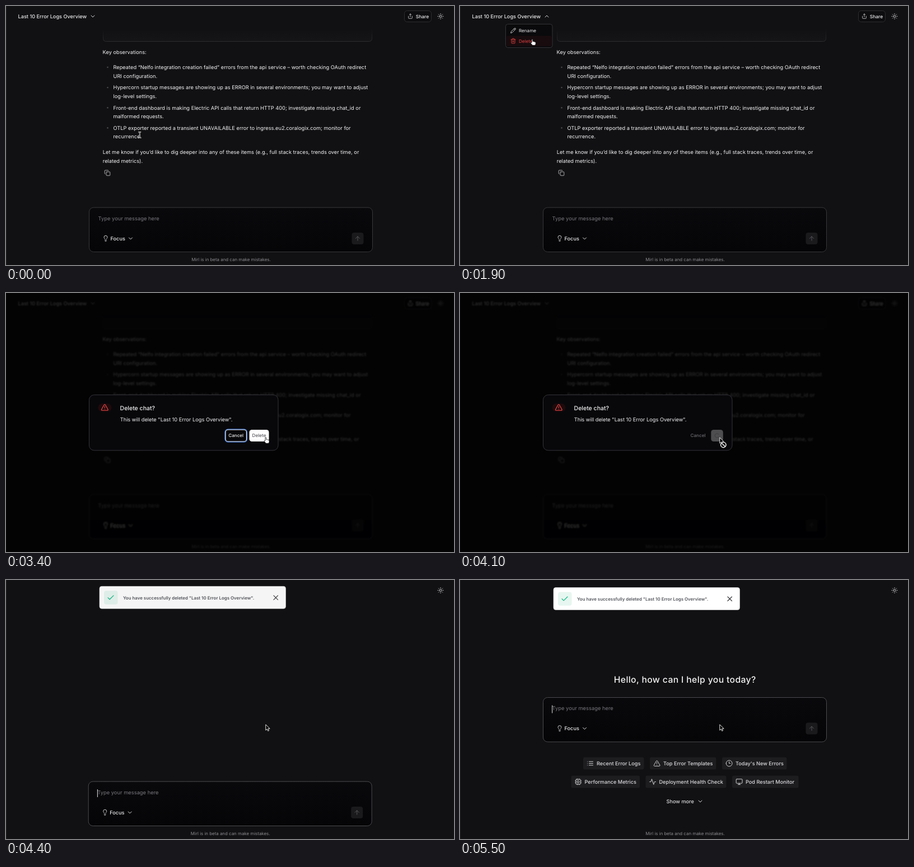
An HTML page that plays this animation: 800x464 px, repeating every 5700 ms.

```html
<!DOCTYPE html>
<html lang="en">
<head>
<meta charset="utf-8">
<title>Delete chat</title>
<style>
html, body { margin: 0; width: 100%; height: 100%; overflow: hidden; background: #111113; }
svg { display: block; width: 100vw; height: 100vh; }
text { font-family: Inter, "Liberation Sans", sans-serif; white-space: pre; text-rendering: geometricPrecision; }
</style>
</head>
<body>
<svg id="stage" viewBox="0 0 800 464"></svg>
<script>
const LOOP = 5700, STEP = 100;
const PROSE = 9.25, LABEL = 9.19, SMALL = 7.9;
const TITLE = 'Last 10 Error Logs Overview';

// Icon outlines on a 24 unit grid
const ICONS = {
  chevron: 'm6 9 6 6 6-6',
  share: 'M12 2v13M16 6l-4-4-4 4M4 12v8a2 2 0 0 0 2 2h12a2 2 0 0 0 2-2v-8',
  sun: 'M8 12a4 4 0 1 0 8 0a4 4 0 1 0-8 0M12 2v2M12 20v2M4.9 4.9l1.4 1.4M17.7 17.7l1.4 1.4M2 12h2M20 12h2M6.3 17.7l-1.4 1.4M19.1 4.9l-1.4 1.4',
  copy: 'M10 8h10a2 2 0 0 1 2 2v10a2 2 0 0 1-2 2H10a2 2 0 0 1-2-2V10a2 2 0 0 1 2-2zM4 16c-1.1 0-2-.9-2-2V4c0-1.1.9-2 2-2h10c1.1 0 2 .9 2 2',
  bulb: 'M15 14c.2-1 .7-1.7 1.5-2.5 1-.9 1.5-2.2 1.5-3.5A6 6 0 0 0 6 8c0 1 .2 2.2 1.5 3.5.7.7 1.3 1.5 1.5 2.5M9 18h6M10 22h4',
  up: 'm5 12 7-7 7 7M12 19V5',
  pencil: 'M17 3a2.85 2.83 0 1 1 4 4L7.5 20.5 2 22l1.5-5.5ZM15 5l4 4',
  trash: 'M3 6h18M19 6v14a2 2 0 0 1-2 2H7a2 2 0 0 1-2-2V6M8 6V4a2 2 0 0 1 2-2h4a2 2 0 0 1 2 2v2M10 11v6M14 11v6',
  warn: 'm21.73 18-8-14a2 2 0 0 0-3.48 0l-8 14A2 2 0 0 0 4 21h16a2 2 0 0 0 1.73-3M12 9v4M12 17h.01',
  list: 'M8 6h13M8 12h13M8 18h13M3 6h.01M3 12h.01M3 18h.01',
  clock: 'M2 12a10 10 0 1 0 20 0a10 10 0 1 0-20 0M12 6v6h4',
  cpu: 'M6 4h12a2 2 0 0 1 2 2v12a2 2 0 0 1-2 2H6a2 2 0 0 1-2-2V6a2 2 0 0 1 2-2zM9 9h6v6H9zM15 2v2M15 20v2M2 15h2M2 9h2M20 15h2M20 9h2M9 2v2M9 20v2',
  pulse: 'M22 12h-4l-3 9L9 3l-3 9H2',
  monitor: 'M4 3h16a2 2 0 0 1 2 2v10a2 2 0 0 1-2 2H4a2 2 0 0 1-2-2V5a2 2 0 0 1 2-2zM8 21h8M12 17v4',
  check: 'M20 6 9 17l-5-5',
  close: 'M18 6 6 18M6 6l12 12',
  spinner: 'M21 12a9 9 0 1 1-6.2-8.6'
};

const icon = (name, cx, cy, size, color, weight = 2) =>
  `<path d="${ICONS[name]}" transform="translate(${cx - size / 2} ${cy - size / 2}) scale(${size / 24})"
    fill="none" stroke="${color}" stroke-width="${weight}" stroke-linecap="round" stroke-linejoin="round"/>`;

const text = (x, y, str, size = PROSE, fill = '#f4f4f6', weight = 400, extra = '') =>
  `<text x="${x}" y="${y}" font-size="${size}" font-weight="${weight}" fill="${fill}" ${extra}>${str}</text>`;

const box = (x, y, w, h, r, fill, stroke = 'none', extra = '') =>
  `<rect x="${x}" y="${y}" width="${w}" height="${h}" rx="${r}" fill="${fill}" stroke="${stroke}" ${extra}/>`;

const group = (id, content, extra = '') => `<g id="${id}" ${extra}>${content}</g>`;
const centered = 'text-anchor="middle"';

function observations() {
  const items = [
    ['Repeated “Nelfo integration creation failed” errors from the api service – worth checking OAuth redirect', 'URI configuration.'],
    ['Hypercorn startup messages are showing up as ERROR in several environments; you may want to adjust', 'log-level settings.'],
    ['Front-end dashboard is making Electric API calls that return HTTP 400; investigate missing chat_id or', 'malformed requests.'],
    ['OTLP exporter reported a transient UNAVAILABLE error to ingress.eu2.coralogix.com; monitor for', 'recurrence.']
  ];
  return items.map(([first, second], i) => {
    const y = 113.1 + 36.2 * i;
    return `<circle cx="181.5" cy="${y - 3.3}" r="1.3" fill="#48484c"/>` +
      text(191.5, y, first) + text(191.5, y + 15.75, second);
  }).join('');
}

function chips() {
  const items = [
    ['list', 'Recent Error Logs', 220, 317.5, 108.5],
    ['warn', 'Top Error Templates', 339, 317.5, 118.5],
    ['clock', "Today's New Errors", 468, 317.5, 115.5],
    ['cpu', 'Performance Metrics', 198.5, 350.5, 122.5],
    ['pulse', 'Deployment Health Check', 331.5, 350.5, 144],
    ['monitor', 'Pod Restart Monitor', 486, 350.5, 118.5]
  ];
  return items.map(([name, label, x, y, w]) =>
    box(x, y, w, 22, 3, '#1d1d20') + icon(name, x + 12.6, y + 11, 13, '#d6d6d9', 1.8) +
    text(x + 24, y + 14.3, label, LABEL, '#dcdcdf', 500)).join('') +
    text(368.5, 399.8, 'Show more', LABEL, '#dcdcdf', 500) + icon('chevron', 429, 396.5, 12, '#dcdcdf');
}

const header = text(21.5, 21.8, TITLE, LABEL, '#ececee', 500) +
  group('titleArrow', icon('chevron', 0, 0, 12, '#d8d8db')) +
  box(711.5, 8.5, 48, 20, 5, '#0d0d0f', '#2e2e32') +
  icon('share', 722, 18.2, 10, '#e4e4e7', 1.8) + text(731.7, 21.5, 'Share', 8.5, '#ececee', 500);

const answer =
  '<path d="M173.500 40V58.500a5 5 0 0 0 5 5H648.500a5 5 0 0 0 5-5V40" fill="url(#cardFill)" stroke="url(#cardLine)"/>' +
  text(172.6, 85.7, 'Key observations:') + observations() +
  text(172.8, 265.2, 'Let me know if you’d like to dig deeper into any of these items (e.g., full stack traces, trends over time, or') +
  text(172.8, 281, 'related metrics).') + icon('copy', 181, 299, 11.5, '#c4c4c8', 1.8);

const composer = box(148.5, 0.5, 506, 79.5, 8, 'url(#inputFill)', '#38383c', 'id="frame"') +
  text(164.6, 23.4, 'Type your message here', 9.35, '#77777c') +
  box(164.2, 14.5, 1, 14, 0, '#e8e8ea', 'none', 'id="caret"') +
  icon('bulb', 178, 55.8, 12, '#e0e0e3', 1.8) + text(186.5, 59.2, 'Focus', LABEL, '#ececee', 500) +
  icon('chevron', 222.5, 56, 12, '#e0e0e3') +
  box(617.5, 45.5, 21, 21, 4, '#1a1a1d') + icon('up', 628, 56, 12.5, '#5a5a5f', 1.8);

const menu = box(81.5, 32.5, 83.5, 42, 4, '#0a0a0c', '#343438') +
  box(83, 35, 80.5, 18, 2, '#1b1b1e', 'none', 'id="renameRow"') +
  box(83, 53.5, 80.5, 18.5, 2, '#180c0e', 'none', 'id="deleteRow"') +
  icon('pencil', 95, 44, 10.5, '#e0e0e3') + text(105, 47, 'Rename', 8.1, '#ececee') +
  icon('trash', 95, 62.6, 10.5, '#e24040') + text(105, 65.7, 'Delete', 8.1, '#e24040');

const dialog = box(148.5, 182.5, 337.5, 99.5, 9, '#08080b', '#34343a') +
  box(164.5, 198, 24, 14.5, 7, '#1e0a0c') + icon('warn', 176.3, 205, 14, '#ef4b4b') +
  text(203.6, 210.2, 'Delete chat?', 10.5, '#f4f4f5', 500) +
  text(203.7, 229.7, `This will delete "${TITLE}".`) +
  group('ready',
    box(391.5, 244.5, 38.5, 22, 5, '#08080b', '#2f5fb5', 'stroke-width="2.6"') +
    box(392, 245, 37.5, 21, 4.5, '#08080b', '#f2f4f8', 'stroke-width="1.2"') +
    text(410.7, 258, 'Cancel', 8.1, '#ececee', 500, centered) +
    box(434.5, 245, 35, 21, 4.5, '#ffffff') +
    text(452, 258, 'Delete', 8.1, '#5a5a60', 500, centered)) +
  group('busy', text(425, 258, 'Cancel', 8.1, '#6c6c70', 500, centered) +
    box(448.3, 245, 21.5, 21, 4.5, '#4e4e51') + group('spinner', icon('spinner', 0, 0, 10, '#3a3a3d')));

const toast = box(167, 13.5, 332.5, 40, 4, '#ffffff', '#e4e4e7', 'stroke-width=".6"') +
  box(175, 21.5, 24.5, 24.5, 4, '#e7f6f0') + icon('check', 187, 33.8, 15, '#12b886') +
  text(209, 36.8, `You have successfully deleted "${TITLE}".`, SMALL, '#54565c', 600) +
  icon('close', 481.7, 33.8, 15, '#3c3c40');

const cursors =
  group('arrow', '<path d="M0 0V10.200L2.400 8 4 11.500 5.700 10.800 4.200 7.300H7.400Z" fill="#000" stroke="#fff" stroke-width=".9" stroke-linejoin="round"/>') +
  group('hand', '<path d="M-.9.500C-.9-.7.900-.7.900.500V3.600C1.600 3.100 2.600 3.300 2.800 4 3.600 3.600 4.500 3.900 4.600 4.600 5.500 4.300 6.200 4.800 6.200 5.700V7.400C6.200 9 5.200 9.400 5.200 10.300H0C-.3 8.800-1.700 8-2.700 6.200-3 5.400-2 4.900-1.400 5.500L-.9 6Z" fill="#fff" stroke="#000" stroke-width=".7"/>') +
  group('beam', ['#fff', '#000'].map((c, i) =>
    `<path d="M-2.500-5Q0-5 0-3.500Q0-5 2.500-5M0-3.500V3.500M-2.500 5Q0 5 0 3.500Q0 5 2.500 5M-1.300 1.500H1.300" fill="none" stroke="${c}" stroke-width="${i ? .6 : 1.7}"/>`).join('')) +
  group('denied', '<circle cx="6.500" cy="13" r="5.700" fill="#000"/><g fill="none" stroke="#fff" stroke-width="1.500"><circle cx="6.500" cy="13" r="4.700"/><path d="M3.200 9.700 9.800 16.300"/></g>');

const shade = (id, y1, y2, from, to) =>
  `<linearGradient id="${id}" gradientUnits="userSpaceOnUse" x1="0" x2="0" y1="${y1}" y2="${y2}">
    <stop stop-color="${from}"/><stop offset="1" stop-color="${to}"/></linearGradient>`;

const stage = document.getElementById('stage');
stage.innerHTML = '<defs>' +
  shade('cardLine', 42, 63, '#111113', '#2c2c30') + shade('cardFill', 42, 63, '#111113', '#151518') +
  shade('inputFill', 0, 80, '#09090c', '#050507') +
  '<filter id="blur" filterUnits="userSpaceOnUse" x="0" y="0" width="800" height="464"><feGaussianBlur stdDeviation="1.1"/></filter></defs>' +
  box(0, 0, 800, 464, 0, '#111113') + box(0, 0, 1, 464, 0, '#222225') +
  group('page',
    group('chat', header + answer) +
    icon('sun', 776, 18.5, 12, '#d8d8db', 1.8) +
    group('home',
      group('hello', text(401.7, 184, 'Hello, how can I help you today?', 15.74, '#f4f4f5', 500, centered + ' letter-spacing=".36"')) +
      group('chips', chips())) +
    group('composer', composer) +
    group('footer', text(402, 456.8, 'Mirl is in beta and can make mistakes.', SMALL, '#8c8c91', 400, centered)) +
    group('menu', menu)) +
  box(0, 0, 800, 464, 0, '#000', 'none', 'id="veil"') +
  group('dialog', dialog) + group('toast', toast) + group('cursor', cursors);

const el = {};
stage.querySelectorAll('[id]').forEach(node => { el[node.id] = node; });

const clamp = v => Math.min(1, Math.max(0, v));
const smooth = v => v * v * (3 - 2 * v);
const show = (id, on) => el[id].setAttribute('display', on ? 'inline' : 'none');
const fade = (id, v) => el[id].setAttribute('opacity', v);
const place = (id, x, y, rest = '') => el[id].setAttribute('transform', `translate(${x} ${y}) ${rest}`);

// CSS "ease" curve: cubic-bezier(.25, .1, .25, 1)
function ease(x) {
  const curve = (a, b, u) => 3 * a * u * (1 - u) ** 2 + 3 * b * u * u * (1 - u) + u ** 3;
  let lo = 0, hi = 1;
  for (let i = 0; i < 24; i++) {
    const mid = (lo + hi) / 2;
    if (curve(.25, .25, mid) < x) lo = mid; else hi = mid;
  }
  return curve(.1, 1, lo);
}

// Pointer stops: time, x, y
const PATH = [
  [0, 238.7, 230.7], [600, 172, 44], [1000, 148, 21], [1400, 148, 21],
  [1800, 129, 60], [2800, 128.5, 60.5], [3400, 463.8, 259], [LOOP, 463.8, 259]
];

function pointerAt(t) {
  const i = PATH.findIndex((stop, n) => n > 0 && t <= stop[0]);
  const [t0, x0, y0] = PATH[i - 1], [t1, x1, y1] = PATH[i];
  const k = smooth((t - t0) / (t1 - t0));
  return [x0 + (x1 - x0) * k, y0 + (y1 - y0) * k];
}

function pointerKind(t, x, y) {
  if (t >= 4200) return 'arrow';
  if (t >= 3900) return 'denied';
  if (t >= 2500) return t >= 3400 ? 'hand' : 'arrow';
  if (x > 173 && y > 76) return 'beam';
  return y < 28 || (t >= 1300 && y > 34) ? 'hand' : 'arrow';
}

function draw(t) {
  const chatOpen = t < 4200, homeOpen = t >= 4500;
  const menuOpen = t >= 1300 && t < 2500;
  const modal = chatOpen ? clamp((t - 2400) / 200) : 0;
  const busy = t >= 3900;

  const [x, y] = pointerAt(t);
  const kind = pointerKind(t, x, y);
  place('cursor', x, y);
  for (const id of ['hand', 'beam', 'denied']) show(id, kind === id);
  show('arrow', kind === 'arrow' || kind === 'denied');

  show('chat', chatOpen);
  show('menu', menuOpen);
  show('renameRow', y > 35 && y < 53.5);
  show('deleteRow', y >= 53.5);
  place('titleArrow', 155, 18.5, menuOpen ? 'rotate(180)' : '');

  if (modal) el.page.setAttribute('filter', 'url(#blur)');
  else el.page.removeAttribute('filter');
  show('veil', modal > 0);
  fade('veil', .8 * modal);
  show('dialog', modal > 0);
  fade('dialog', modal);
  const zoom = .95 + .05 * modal;
  place('dialog', 317.2 * (1 - zoom), 232.2 * (1 - zoom), `scale(${zoom})`);
  show('ready', !busy);
  show('busy', busy);
  place('spinner', 459, 255.5, `rotate(${t * .36})`);

  const drop = homeOpen && t < 5000 ? 5 * Math.exp((4500 - t) / 93) : 0;
  const shift = !chatOpen && !homeOpen ? -1.3 : 0;
  show('home', homeOpen);
  place('home', 0, drop);
  fade('hello', clamp((t - 4450) / 205));
  fade('chips', clamp((t - 4530) / 280));
  place('composer', shift, homeOpen ? 210 + drop : 360.5);
  place('footer', shift, 0);
  el.frame.setAttribute('stroke', chatOpen ? '#38383c' : '#4c4c50');
  show('caret', !chatOpen && !(t >= 4700 && t < 5200));

  const slide = ease(clamp((t - 4100) / 400));
  show('toast', !chatOpen);
  place('toast', 0, -54 * (1 - slide));
  fade('toast', slide);
}

const start = performance.now();
function tick() {
  const t = (performance.now() - start) % LOOP;
  draw(Math.floor(t / STEP) * STEP);
  requestAnimationFrame(tick);
}
tick();
</script>
</body>
</html>
```
